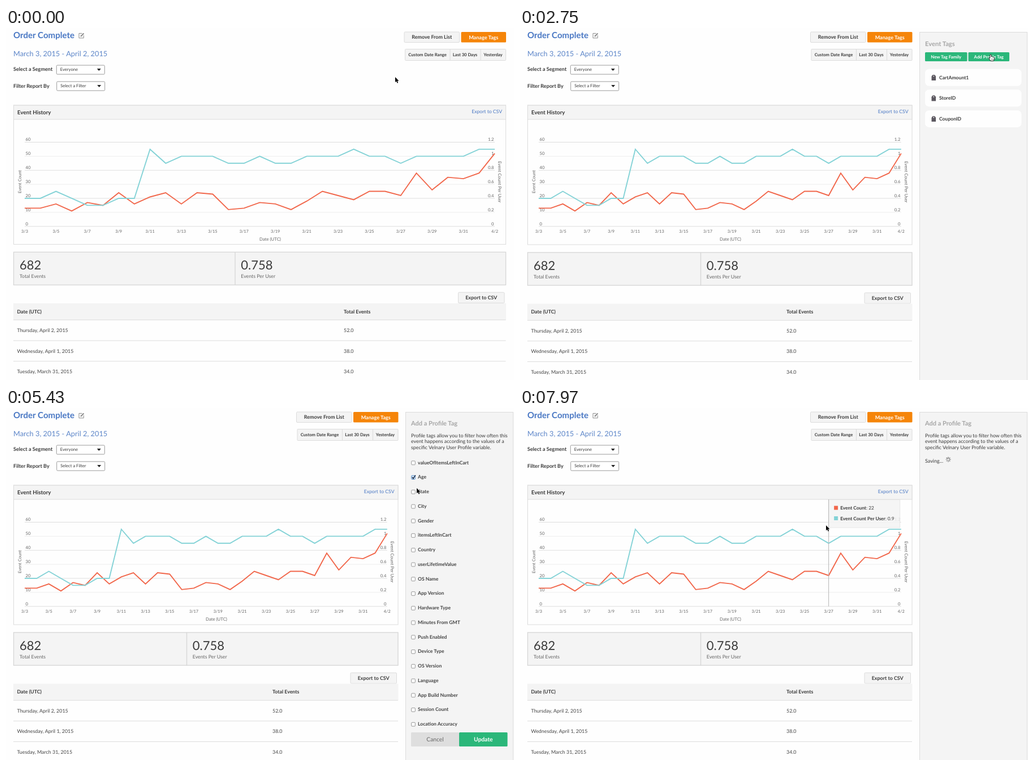
An HTML page that plays this animation: 898x624 px, repeating every 8 s.

```html
<!DOCTYPE html>
<html lang="en">
<head>
<meta charset="utf-8">
<title>Order Complete</title>
<style>
  html, body { margin: 0; width: 100%; height: 100%; overflow: hidden; background: #fefefe; }
  svg { display: block; font-family: Lato, "Open Sans", sans-serif; text-rendering: geometricPrecision; }
</style>
</head>
<body>
<svg id="stage" width="898" height="624" viewBox="0 0 898 624"></svg>
<script>
const LOOP = 8000;
const PANEL_OPENS = 1520, PROFILE_OPENS = 3200, AGE_CHECKED = 4990, SAVING = 6930;

const BLUE = '#4a78c4', DARK = '#3a3a3a', GREY = '#666', BORDER = '#dcdcdc', FILL = '#f4f4f4';
const ORANGE = '#f58509', GREEN = '#2bb77a', RED = '#f1664a', CYAN = '#83d2d6';

const counts = [13, 13, 16, 11, 17, 15, 24, 16, 21, 24, 16, 24, 23, 12, 13, 17,
  16, 12, 18, 25, 22, 19, 25, 25, 22, 38, 26, 35, 34, 38, 52];
const perUser = [4, 4, 5, 4, 3, 3, 4, 4, 11, 9, 10, 10, 10, 9, 9, 10,
  9, 9, 10, 10, 10, 11, 10, 10, 9, 10, 10, 10, 10, 11, 11].map(v => v / 10);
const profileTags = ['valueOfItemsLeftInCart', 'Age', 'State', 'City', 'Gender', 'itemsLeftInCart',
  'Country', 'userLifetimeValue', 'OS Name', 'App Version', 'Hardware Type', 'Minutes From GMT',
  'Push Enabled', 'Device Type', 'OS Version', 'Language', 'App Build Number', 'Session Count',
  'Location Accuracy'];

// Pointer moves in even steps between two times; a third value marks the hand.
const start = [688, 87];
const moves = [
  [300, 1220, [[694, 84], [718, 70], [762, 46], [803, 25], [828, 13, 1], [834, 16, 1], [835.3, 18.6, 1]]],
  [2420, 2750, [[834, 28], [832, 43, 1], [832, 47, 1]]],
  [3790, 4540, [[830, 43], [802, 52], [760, 80], [731, 106], [719, 117], [716, 119.5]]],
  [4840, 5140, [[718, 120], [719, 121], [720.5, 121.5]]],
  [5430, 6180, [[726, 142], [752, 250], [792, 400], [824, 520], [838, 578, 1], [840.3, 586, 1]]],
  [6930, 7970, [[840, 586], [834, 568], [802, 478], [745, 372], [690, 282], [630, 224], [549, 206], [541, 208]]]
];

function pointerAt(t) {
  let point = start;
  for (const [from, to, points] of moves) {
    if (t < from) break;
    const step = Math.floor((t - from) / (to - from) * (points.length - 1) + 0.02);
    point = points[Math.min(step, points.length - 1)];
  }
  return point;
}

const rect = (x, y, x2, y2, fill, stroke = 'none', r = 0, extra = '') =>
  `<rect x="${x}" y="${y}" width="${x2 - x}" height="${y2 - y}" rx="${r}" fill="${fill}" stroke="${stroke}" ${extra}/>`;
const line = (x, y, x2, y2, stroke = BORDER, width = 1) =>
  `<path d="M${x} ${y}L${x2} ${y2}" stroke="${stroke}" stroke-width="${width}"/>`;
// y is the middle of the capitals
const text = (x, y, s, size, fill = DARK, extra = '') =>
  `<text x="${x}" y="${y + size * 0.36}" font-size="${size}" fill="${fill}" ${extra}>${s}</text>`;
const BOLD = 'font-weight="700"', MIDDLE = 'text-anchor="middle"', END = 'text-anchor="end"';
const bold = (x, y, s, size, fill, extra = '') => text(x, y, s, size, fill, BOLD + ' ' + extra);
const button = (x, y, x2, y2, label, size, fill = FILL, stroke = BORDER, color = DARK, weight = BOLD) =>
  rect(x, y, x2, y2, fill, stroke, 1.5) +
  text((x + x2) / 2, (y + y2) / 2, label, size, color, weight + ' ' + MIDDLE);

const chartY = v => 351.7 - v * 2.487;
const chartX = (i, narrow) => 33 + i * (narrow ? 21.36 : 27.7);
const plotRight = narrow => chartX(30, narrow);

function dropdown(x, y, label) {
  return rect(x, y, x + 85, y + 16, '#fff', '#9a9a9a', 1.5) + text(x + 6.5, y + 7.6, label, 7.6) +
    `<path d="M${x + 71.5} ${y + 6}h7l-3.5 4z" fill="#222"/>`;
}

function header(shift) {
  const x = v => v - shift;
  return bold(13, 13, 'Order Complete', 15.1, BLUE) +
    `<g fill="none" stroke="#8c8c8c"><path d="M134.5 9.5H129v8.3h8.3V13"/>
     <path d="M132 15l5.5-5.5" stroke-width="2"/></g>` +
    text(13, 45, 'March 3, 2015 - April 2, 2015', 12.8, '#5d86c9') +
    bold(13, 73, 'Select a Segment', 9.1) + dropdown(89.3, 66, 'Everyone') +
    bold(13, 102.5, 'Filter Report By', 9.1) + dropdown(89.7, 95, 'Select a Filter') +
    button(x(704), 7, x(801.5), 25.5, 'Remove From List', 8.95) +
    button(x(804.5), 7, x(884), 25.5, 'Manage Tags', 9.1, ORANGE, 'none', '#fff') +
    rect(x(705.5), 37.5, x(883.5), 57.5, FILL, BORDER, 1) +
    line(x(785), 37.5, x(785), 57.5) + line(x(839), 37.5, x(839), 57.5) +
    [[745, 'Custom Date Range'], [811.5, 'Last 30 Days'], [861, 'Yesterday']]
      .map(([cx, s]) => bold(x(cx), 47.5, s, 7.65, DARK, MIDDLE)).join('');
}

function chart(narrow, shift) {
  const right = 883.5 - shift, end = plotRight(narrow);
  let out = rect(13.5, 137, right, narrow ? 384 : 383.5, '#fefefe', BORDER) +
    rect(13.5, 137, right, 162, FILL, BORDER) +
    bold(20, 149, 'Event History', 9.8) +
    text(right - 6.5, 148.2, 'Export to CSV', 8.65, BLUE, END);
  for (let v = 0; v <= 60; v += 10) {
    const y = chartY(v);
    out += line(33, y, end, y, v % 20 ? '#ededed' : '#dedede') +
      text(34.5, y - 4.9, v, 7.7, GREY) +
      text(end - 1.5, y - 4.9, +(v / 50).toFixed(1), 7.6, GREY, END);
  }
  for (let i = 0; i <= 30; i += 2) {
    const label = i < 29 ? '3/' + (i + 3) : '4/2';
    out += text(chartX(i, narrow), 360.5, label, 7.4, GREY, MIDDLE);
  }
  const polyline = (values, scale, color) => `<polyline fill="none" stroke="${color}" stroke-width="1.9" points="${
    values.map((v, i) => chartX(i, narrow) + ',' + chartY(v * scale)).join(' ')}"/>`;
  const rotated = (x, y, angle, s, size) =>
    `<g transform="translate(${x} ${y}) rotate(${angle})">${text(0, 0, s, size, GREY, MIDDLE)}</g>`;
  return out + text(narrow ? 372 : 467, 374.5, 'Date (UTC)', 7.75, GREY, MIDDLE) +
    rotated(24.5, 272.5, -90, 'Event Count', 7.55) +
    rotated(end + 9, 272.8, 90, 'Event Count Per User', 7.8) +
    polyline(counts, 1, RED) + polyline(perUser, 50, CYAN);
}

function totals(narrow, shift) {
  const right = 883.5 - shift, split = narrow ? 319.5 : 405, column = narrow ? 471 : 597;
  const rows = [['Thursday, April 2, 2015', '52.0'], ['Wednesday, April 1, 2015', '38.0'],
    ['Tuesday, March 31, 2015', '34.0']];
  return `<g transform="translate(0 ${narrow ? 0.7 : 0})">` +
    rect(13.5, 397.3, right, 455.5, FILL, '#d6d6d6', 0, 'stroke-width="1.3"') +
    line(split, 397, split, 455.5, '#d6d6d6', 1.3) +
    text(24, 420.5, '682', 22) + text(24, 440, 'Total Events', 8.7, GREY) +
    text(split + 10.3, 420.5, '0.758', 22) + text(split + 10.3, 440, 'Events Per User', 8.8, GREY) +
    button(right - 84, 468.7, right - 2.5, 487.5, 'Export to CSV', 8.9) +
    rect(13, 488, right + 0.5, 517.5, FILL) + line(13, 517.5, right, 517.5) +
    bold(19.5, 502.5, 'Date (UTC)', 8.85) + bold(column, 502.5, 'Total Events', 8.8) +
    rows.map(([day, total], i) => {
      const y = 536 + i * 36.6;
      return text(19.5, y, day, 8.87, '#444') + text(column, y, total, 8.87, '#444') +
        line(13, y + 18.2, right, y + 18.2);
    }).join('') + '</g>';
}

function tagList() {
  return bold(716, 27.5, 'Event Tags', 11.2, '#a6a6a6') +
    button(716, 43, 790.5, 59, 'New Tag Family', 7.8, GREEN, 'none', '#fff') +
    button(792.5, 43, 865, 59, 'Add Profile Tag', 7.8, GREEN, 'none', '#fff') +
    ['CartAmount1', 'StoreID', 'CouponID'].map((name, i) => {
      const y = 87.7 + i * 36.6;
      return rect(716, y - 15, 886.5, y + 15, '#fefefe', 'none', 7) +
        `<path d="M727.5 ${y + 5.2}v-7.2l2-2.7h3.6l2 2.7v7.2z" fill="#5c5860"/>
         <circle cx="731.3" cy="${y - 2.4}" r="0.9" fill="#fefefe"/>` +
        bold(741, y, name, 8.6);
    }).join('');
}

function profileIntro() {
  return bold(716, 27.5, 'Add a Profile Tag', 11, '#a6a6a6') +
    ['Profile tags allow you to filter how often this', 'event happens according to the values of a',
      'specific Velnary User Profile variable.']
      .map((s, i) => text(716, 48.5 + i * 10.8, s, 8.84)).join('');
}

function profileForm(ageChecked) {
  return profileTags.map((name, i) => {
    const y = 97.3 + i * 25.75, checked = ageChecked && name === 'Age';
    return rect(716.6, y - 3.4, 723.4, y + 3.4, checked ? '#cfe3f8' : '#fafafa', checked ? '#5b8fc7' : '#929292', 1.3, 'stroke-width="0.9"') +
      (checked ? `<path d="M718 ${y - 0.5}l1.8 2.6l4-6" fill="none" stroke="#1c2a44" stroke-width="1.5"/>` : '') +
      bold(728, y - 0.8, name, 8.6, '#444');
  }).join('') +
    button(716, 575, 801, 600, 'Cancel', 10.3, '#dedede', 'none', GREY, '') +
    button(801, 575, 886.5, 600, 'Update', 10.3, GREEN, 'none', '#fff');
}

function saving(t) {
  const phase = Math.floor((t - SAVING) / 148);
  let out = text(716, 93.5, 'Saving...', 9);
  for (let i = 0; i < 8; i++) {
    out += `<path d="M0 -1.5V-4.6" transform="translate(757 91.3) rotate(${i * 45})"
      stroke="#777" stroke-width="1.5" opacity="${1 - ((i + 8 - phase % 8) % 8) * 0.07}"/>`;
  }
  return out;
}

function tooltip([x, y]) {
  const end = plotRight(true);
  if (y < 162 || y > chartY(0) || x < 33 || x > end) return '';
  const i = Math.round((x - 33) / 21.36), px = chartX(i, true);
  const left = px + 126 > end ? px - 126 : px;
  const entry = (cy, color, label, value) =>
    rect(left + 9.5, cy - 3.5, left + 16.3, cy + 3.5, color) +
    text(left + 20.5, cy, `<tspan ${BOLD}>${label}</tspan>: ${value}`, 8.35);
  return rect(left, 162.5, left + 126, 212, '#f4f4f4', '#e2e2e2', 0, 'opacity="0.88"') +
    line(px, 162, px, 351.7, '#b5b5b5') +
    entry(177, RED, 'Event Count', counts[i]) +
    entry(195.5, CYAN, 'Event Count Per User', perUser[i]);
}

function pointer([x, y, hand]) {
  const shape = hand
    ? `<path d="M-1.2 .8Q0 -1 1.2 .8V4Q2.6 3.2 3.3 4.5Q4.5 3.8 5.1 5.1Q6.7 4.8 6.6 6.5Q6.6 9 5.2 11.3H-.2
       Q-1.5 8.8 -3.4 6.8Q-3.6 5 -1.2 6.5Z" fill="#fff" stroke="#222" stroke-width="1"/>
       <path d="M1.4 7.4v2M3 7.4v2M4.5 7.4v2" stroke="#222" stroke-width=".6"/>`
    : `<path d="M0 0V9.2L2.1 7.3L3.6 10.8L5.2 10.1L3.7 6.7H6.5Z" fill="#000" stroke="#fff"
       stroke-width="1" paint-order="stroke"/>`;
  return `<g transform="translate(${x} ${y})">${shape}</g>`;
}

const page = narrow => {
  const shift = narrow ? 190.5 : 0;
  return header(shift) + chart(narrow, shift) + totals(narrow, shift);
};
const widePage = page(false);
const narrowPage = page(true) + rect(706.5, 7.5, 896.5, 640, FILL, BORDER);

function scene(t) {
  const point = pointerAt(t);
  let out = widePage;
  if (t >= PANEL_OPENS) {
    out = narrowPage;
    if (t < PROFILE_OPENS) out += tagList();
    else out += profileIntro() + (t < SAVING ? profileForm(t >= AGE_CHECKED) : saving(t));
    if (t >= SAVING) out += tooltip(point);
  }
  return out + pointer(point);
}

const stage = document.getElementById('stage');
let shown = '';
function draw() {
  const next = scene(performance.now() % LOOP);
  if (next !== shown) stage.innerHTML = shown = next;
  requestAnimationFrame(draw);
}
draw();
</script>
</body>
</html>
```
